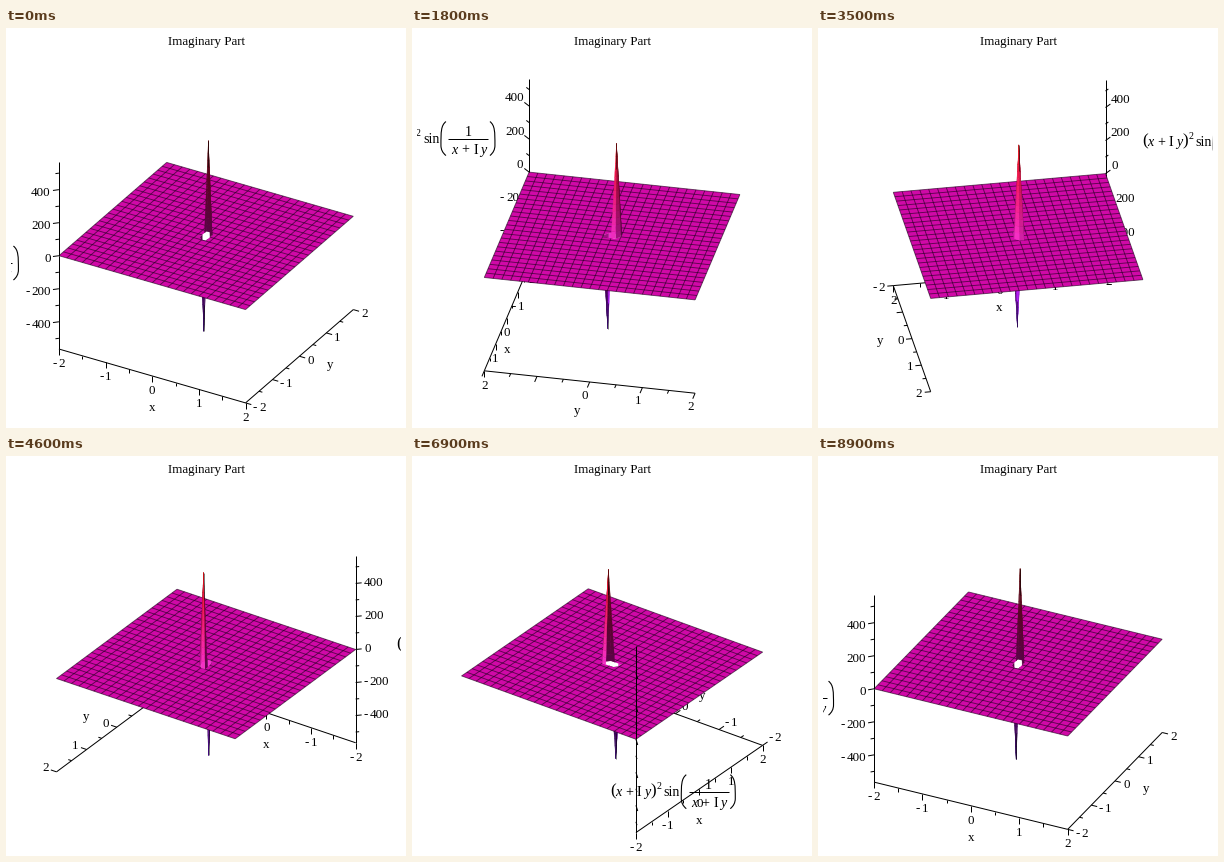
A matplotlib script for the animation above (9000 ms loop, 400 px wide and 400 px high).

```python
import colorsys

import matplotlib.pyplot as plt
import numpy as np
from matplotlib.animation import FuncAnimation
from matplotlib.collections import LineCollection, PolyCollection
from matplotlib.patches import PathPatch
from matplotlib.path import Path

FRAMES, STEP = 90, 100
PX = 0.72                     # points per pixel at 100 dpi
CX, CY, SIDE = 199.6, 207.5, 215.5
ZMAX = 565.0
H = 1 / 12                    # sampling step of the surface
PLANE = (0.815, 0.035, 0.655)
# foot of the upper spike, in steps; the lower one is its point reflection
FAN = np.array([(1, 0), (1, 1), (0, 2), (-1, 2), (-1, 1)]) * H

plt.rcParams["font.family"] = "Liberation Serif"
fig = plt.figure(figsize=(4, 4), dpi=100, facecolor="white")
ax = fig.add_axes([5 / 400, 5 / 400, 390 / 400, 390 / 400])
ax.set_xlim(4.5, 394.5)
ax.set_ylim(394.5, 4.5)
ax.axis("off")
ax.text(200.5, 17, "Imaginary Part", size=13 * PX, ha="center", va="baseline")

parts = []


def keep(artist):
    parts.append(artist)
    return artist


def text(x, y, s, z, size=13, italic=False):
    keep(ax.text(x, y, s, size=size * PX, ha="center", va="baseline", zorder=z,
                 style="italic" if italic else "normal", clip_on=True))


def lines(segs, z, color="black", width=1.0, alpha=1.0):
    keep(ax.add_collection(LineCollection(
        segs, colors=color, linewidths=width * PX, alpha=alpha, zorder=z)))


class View:
    """Orthographic view, turned by an angle and tilted 60 degrees."""

    def __init__(self, deg):
        a = np.radians(deg)
        self.c, self.s = np.cos(a), np.sin(a)
        self.front = np.array([self.s, -self.c])
        self.right = np.array([self.c, self.s])

    def __call__(self, x, y, z=0.0):
        k = SIDE / 4
        return np.array([
            CX + k * (x * self.c + y * self.s),
            CY + k * 0.5 * (x * self.s - y * self.c) - z / ZMAX * SIDE * 0.433])

    def direction(self, x, y):
        d = self(x, y) - (CX, CY)
        return d / np.hypot(*d)


def label_pos(p, u, value):
    hw = 3.2 * len(str(abs(value))) + (2.7 if value < 0 else 0)
    return p + u * (8.5 + hw, 14)


def number(pos, value, z):
    s = str(abs(value))
    x, y = pos
    if value < 0:
        x += 3
        text(x - 3.25 * len(s) - 4, y + 4, "-", z)
    text(x, y + 4, s, z)


def ticks(points, u, z):
    lines([(p, p + u * (6 if major else 3.5)) for p, major in points], z)


def big_paren(x, y, side, z):
    top, bottom, bulge = (x - side * 2.5, y - 17), (x - side * 2.5, y + 17), x + side * 2.5
    path = Path([top, (bulge, y - 13), (bulge, y - 7), (bulge, y + 7),
                 (bulge, y + 7), (bulge, y + 13), bottom],
                [1, 4, 4, 4, 2, 3, 3])
    keep(ax.add_patch(PathPatch(path, fc="none", lw=1.1 * PX, zorder=z)))


def sum_xy(x, y, z):
    for dx, s, it in ((-15, "x", True), (-4.5, "+", False), (6, "I", False), (14, "y", True)):
        text(x + dx, y, s, z, 14, it)


def formula(x, y, z):
    text(x - 60, y + 4, "(", z, 17)
    sum_xy(x - 39.5, y + 4, z)
    text(x - 19, y + 4, ")", z, 17)
    text(x - 14, y - 3, "2", z, 10)
    text(x - 1, y + 4, "sin", z, 14)
    big_paren(x + 11, y, -1, z)
    text(x + 36, y - 3, "1", z, 14)
    lines([[(x + 16, y), (x + 56, y)]], z)
    sum_xy(x + 37, y + 15, z)
    big_paren(x + 60, y, 1, z)


def draw_axes(v):
    low = -ZMAX
    lines([[v(-2, -2, low), v(2, -2, low)], [v(2, -2, low), v(2, 2, low)],
           [v(-2, -2, low), v(-2, -2)]], 1)
    halves = np.arange(-4, 5) / 2

    down = np.array([0.0, 1.0])
    ticks([(v(t, -2, low), t % 1 == 0) for t in halves], down, 1)
    for t in range(-2, 3):
        number(label_pos(v(t, -2, low), down, t), t, 1)
    text(*(v(0, -2, low) + (0, 35)), "x", 1)

    u = v.direction(1, 0)
    ticks([(v(2, t, low), t % 1 == 0) for t in halves], u, 1)
    corner = label_pos(v(2, -2, low), down, 2)
    for t in range(-2, 3):
        pos = label_pos(v(2, t, low), u, t)
        gap = np.abs(pos - corner)
        if t == -2 and gap[0] < 9 and gap[1] < 10 or t == -1 and v.c < 0:
            continue
        number(pos, t, 1)
    text(*(v(2, 0, low) + u * 32 + (0, 3)), "y", 1)

    # vertical axis: its upper half is never covered by the plane
    u = v.direction(-1, -1)
    top = 5 if v.front @ (-1, -1) > 0 else 3
    lines([[v(-2, -2), v(-2, -2, ZMAX)]], top)
    for t in range(-500, 501, 100):
        z = 1 if t < 0 else top
        p = v(-2, -2, t)
        ticks([(p, t % 200 == 0)], u, z)
        if t % 200 == 0 and abs(u[0]) > 0.5:
            number(label_pos(p, u, t), t, z)
    shift = np.clip(122 * u[0], -103, 103), 55 * u[1]
    formula(*(v(-2, -2) + shift), top)


def draw_plane(v):
    def ring(pts):
        return [v(*p) for p in pts] + [v(*pts[0])]

    square = ring([(-2, -2), (2, -2), (2, 2), (-2, 2)])
    hole = ring(np.vstack([FAN, -FAN])[::-1])
    path = Path(square + hole, [1, 2, 2, 2, 79, 1] + [2] * 9 + [79])
    keep(ax.add_patch(PathPatch(path, fc=PLANE, ec="none", zorder=2)))

    grid = []
    for k in range(-12, 13):
        t = k / 6
        if k:
            grid += [[v(t, -2), v(t, 2)], [v(-2, t), v(2, t)]]
        else:
            for s in (-1, 1):
                grid += [[v(0, 2 * s), v(0, 2 * H * s)], [v(2 * s, 0), v(H * s, 0)]]
    lines(grid, 2.1, "#180018", 0.9, 0.62)


def shade(z, light):
    hue = 0.87 + 0.13 * z / ZMAX
    sat = 0.96 - 0.16 * light * (1 - abs(z) / ZMAX)
    return colorsys.hsv_to_rgb(hue % 1, sat, 0.35 + 0.62 * light)


def draw_spike(v, sign, z):
    """Steep triangles from the foot points to one tip, far ones first."""
    tip = np.array([0, sign * H, sign * ZMAX])
    foot = np.column_stack([FAN * sign, np.zeros(len(FAN))])
    faces = sorted(zip(foot[:-1], foot[1:]),
                   key=lambda e: (e[0] + e[1])[:2] @ v.front)
    levels = np.linspace(0, 1, 15)
    for p, q in faces:
        edge = q - p
        normal = sign * np.array([edge[1], -edge[0]]) / np.hypot(*edge[:2])
        facing = normal @ v.front
        light = 0.0
        if facing > 0:
            light = np.clip(0.85 * facing - 0.5 * (normal @ v.right), 0, 1)
        polys, colors = [], []
        for a, b in zip(levels[:-1], levels[1:]):
            quad = [p + (tip - p) * a, q + (tip - q) * a,
                    q + (tip - q) * b, p + (tip - p) * b]
            polys.append([v(*c) for c in quad])
            colors.append(shade(sign * ZMAX * (a + b) / 2, light))
        keep(ax.add_collection(PolyCollection(
            polys, facecolors=colors, edgecolors=colors, linewidths=0.3 * PX, zorder=z)))
    lines([[v(*(tip * (1, 1, 0.72))), v(*tip)]], z + 0.1, "black", 0.9, 0.55)


def draw(i):
    while parts:
        parts.pop().remove()
    v = View(30 + 360 * i / FRAMES)
    draw_axes(v)
    draw_spike(v, -1, 1.5)
    draw_plane(v)
    draw_spike(v, 1, 4)
    return parts


anim = FuncAnimation(fig, draw, frames=FRAMES, interval=STEP,
                     init_func=lambda: [], repeat=True, repeat_delay=0)
plt.show()
```
